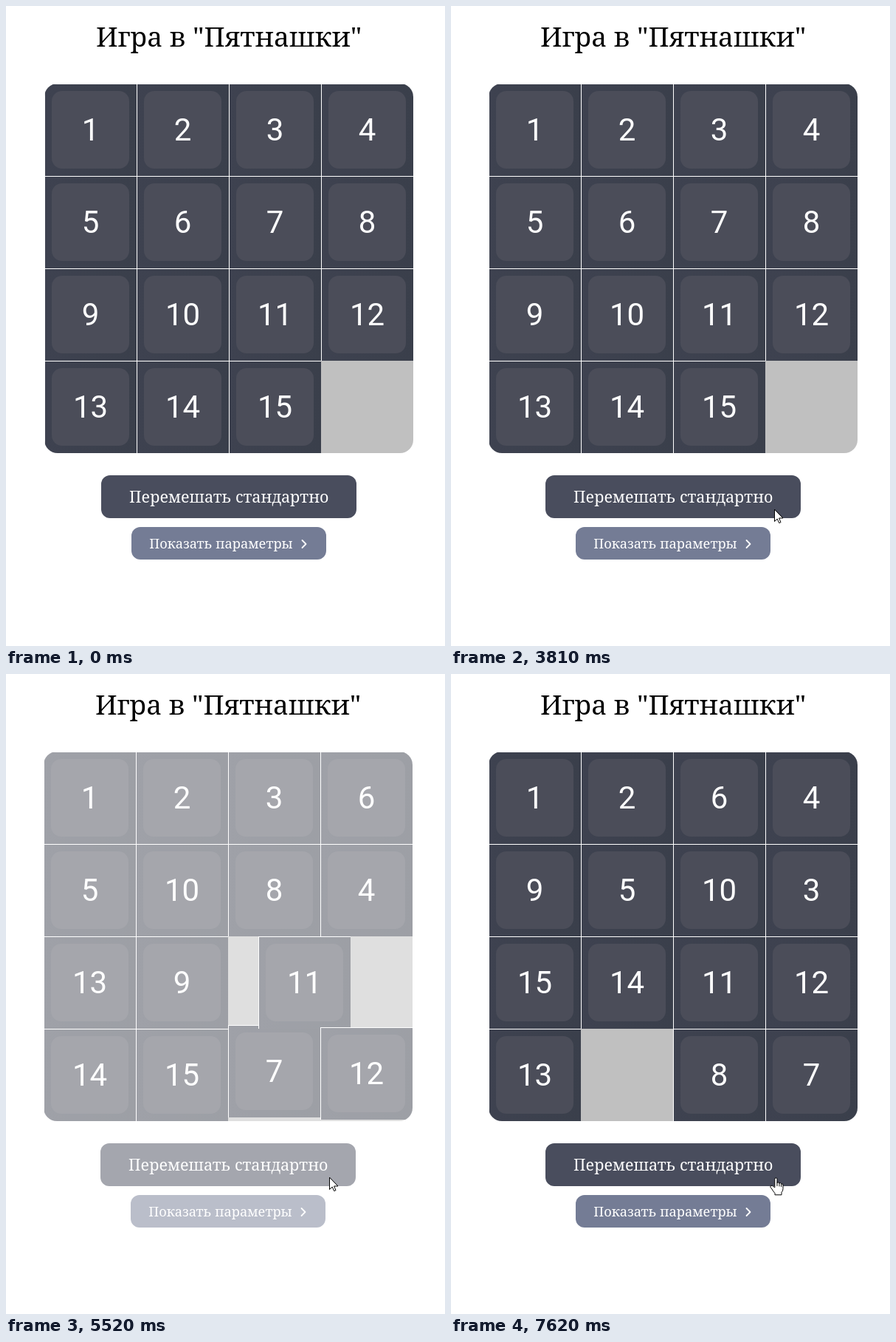
An HTML page with a canvas for the animation above (8000 ms loop, 595 by 866 pixels).

```html
<!DOCTYPE html>
<html lang="ru">
<head>
<meta charset="utf-8">
<title>Игра в "Пятнашки"</title>
<style>
  html, body { margin: 0; width: 100%; height: 100%; overflow: hidden; background: #fff; }
  canvas { display: block; }
</style>
</head>
<body>
<canvas id="stage" width="595" height="866"></canvas>
<script>
const ctx = document.getElementById('stage').getContext('2d');
const LOOP = 8000, CELL = 125, TOP = 105, SIZE = 500;

// Tiles in the order they slide into the gap
const MOVES = [
  12, 11, 7, 6, 5, 1, 2, 3, 6, 8, 4, 6, 3, 2, 1, 5, 10,
  9, 13, 14, 15, 7, 11, 12, 7, 15, 14, 13, 9, 11, 8, 10, 5,
  9, 13, 14, 15, 8, 10, 3, 6, 4, 3, 10, 11, 15, 14, 13, 15, 14
];
const FIRST_MOVE = 3862, MOVE_GAP = 71.4, SLIDE = 200;
const RUN_START = 3810, RUN_STEP = 68.04;
const UNLOCK = 7365;

const clamp = v => Math.min(1, Math.max(0, v));
const lerp = (a, b, p) => a + (b - a) * p;

function bezier(x1, y1, x2, y2) {
  const at = (a, b, s) => 3 * a * s * (1 - s) ** 2 + 3 * b * s * s * (1 - s) + s ** 3;
  return x => {
    if (x <= 0) return 0;
    if (x >= 1) return 1;
    let lo = 0, hi = 1;
    for (let i = 0; i < 20; i++) {
      const mid = (lo + hi) / 2;
      if (at(x1, x2, mid) < x) lo = mid; else hi = mid;
    }
    return at(y1, y2, lo);
  };
}
const ease = bezier(.25, .1, .25, 1);
const easeInOut = bezier(.42, 0, .58, 1);

// Progress from 0 to 1 in a number of hard steps
function stepped(t, from, to, steps) {
  const n = steps - 1;
  return clamp(Math.floor((t - from) / (to - from) * n + .1) / n);
}

function box(x, y, w, h, r, fill) {
  ctx.beginPath();
  ctx.roundRect(x, y, w, h, r);
  ctx.fillStyle = fill;
  ctx.fill();
}

function label(text, x, y, font, color) {
  ctx.font = font;
  ctx.fillStyle = color;
  ctx.textAlign = 'center';
  ctx.fillText(text, x, y);
}

const serif = px => px + 'px "Noto Serif", serif';

function tilePositions(t) {
  const cells = Array.from({ length: 16 }, (_, i) => ({ x: i % 4, y: Math.floor(i / 4) }));
  const tiles = cells.slice(0, 15).map(c => ({ ...c }));
  let gap = cells[15];
  MOVES.forEach((number, i) => {
    const start = FIRST_MOVE + i * MOVE_GAP;
    if (t <= start) return;
    const from = tiles[number - 1], p = ease((t - start) / SLIDE);
    tiles[number - 1] = {
      x: gap.x, y: gap.y,
      dx: lerp(from.x, gap.x, p), dy: lerp(from.y, gap.y, p)
    };
    gap = { x: from.x, y: from.y };
  });
  return tiles;
}

function drawTile(number, x, y) {
  ctx.fillStyle = '#fff';
  ctx.fillRect(x, y, CELL, CELL);
  const shade = ctx.createLinearGradient(x, y, x + CELL, y);
  shade.addColorStop(0, '#3e4250');
  shade.addColorStop(1, '#3a3f4b');
  ctx.fillStyle = shade;
  ctx.fillRect(x + 1, y + 1, CELL - 1, CELL - 1);
  box(x + 10, y + 10, 105, 105, 14, '#4b4d59');
  label(number, x + 62.5, y + 77, '42px Roboto, Arial, sans-serif', '#fff');
}

function drawBoard(t, left) {
  ctx.save();
  ctx.beginPath();
  ctx.roundRect(left, TOP, SIZE, SIZE, 18);
  ctx.clip();
  ctx.fillStyle = '#c0c0c0';
  ctx.fillRect(left, TOP, SIZE, SIZE);
  tilePositions(t).forEach((tile, i) => {
    const { x, y, dx = x, dy = y } = tile;
    drawTile(i + 1, left + Math.round(dx * CELL), TOP + Math.round(dy * CELL));
  });
  ctx.restore();
}

function drawButtons(left) {
  box(left + 77, 635, 346, 58, 12, '#494d5d');
  label('Перемешать стандартно', left + 250.3, 672, serif(21.6), '#fff');
  box(left + 118, 705, 264, 44, 12, '#747c95');
  label('Показать параметры', left + 239.5, 734, serif(18.3), '#fff');
  ctx.beginPath();
  ctx.moveTo(left + 349.5, 723);
  ctx.lineTo(left + 354.5, 728);
  ctx.lineTo(left + 349.5, 733);
  ctx.strokeStyle = '#fff';
  ctx.lineWidth = 1.8;
  ctx.lineCap = ctx.lineJoin = 'round';
  ctx.stroke();
}

const ARROW = 'M.5 .5V16.5L4.2 13L6.7 18.6L9 17.6L6.6 12H11.6Z';
const HAND = 'M.8 13.5V2.5Q.8 .9 2.4 .9T4 2.5V7.3Q5.6 6.2 7 8Q8.8 7 9.7 8.8'
  + 'Q12 8.3 12 10.8V15.5Q12 18.5 10 20.5V23.8H1V21.5Q-1.5 19-3 16'
  + 'L-5.2 13.2Q-5.4 10.8-3 11.2Z';
const KNUCKLES = 'M4 7V11.5M7 8V12M9.7 9V12.5';

function drawCursor(x, y, hand) {
  ctx.save();
  ctx.translate(x, y);
  ctx.lineWidth = 1;
  ctx.lineJoin = 'miter';
  ctx.fillStyle = '#fff';
  ctx.strokeStyle = '#000';
  const shape = new Path2D(hand ? HAND : ARROW);
  ctx.fill(shape);
  ctx.stroke(shape);
  if (hand) ctx.stroke(new Path2D(KNUCKLES));
  ctx.restore();
}

function cursorAt(t) {
  const glide = (x1, y1, x2, y2, p) => [Math.round(lerp(x1, x2, p)), Math.round(lerp(y1, y2, p))];
  if (t < 520) return null;
  if (t < 2270) {
    const p = stepped(t, 520, 1010, 8);
    return glide(533, 810, 360, 548, p * (2 - p));
  }
  if (t < 2810) {
    const p = stepped(t, 2270, 2540, 5);
    return glide(423, 626, 537, 780, p * (2 - p));
  }
  if (t < 3140) return [536, 780];
  return glide(498, 742, 438, 681, stepped(t, 3140, 3280, 3));
}

function overButton(x, y, left) {
  const inside = (bx, by, w, h) => x >= bx && x < bx + w && y >= by && y < by + h;
  return inside(left + 77, 635, 346, 58) || inside(left + 118, 705, 264, 44);
}

function draw(time) {
  const run = Math.floor((time - RUN_START + 8) / RUN_STEP);
  const t = run >= 0 ? RUN_START + run * RUN_STEP : time;
  const left = t < 2810 ? 52 : 51;

  ctx.fillStyle = '#fff';
  ctx.fillRect(0, 0, 595, 866);
  label('Игра в "Пятнашки"', left + 250, 55, serif(37), '#000');
  drawBoard(t, left);
  drawButtons(left);

  // A white veil over the board and buttons equals their half opacity
  const veil = .5 * (easeInOut((t - 3800) / 430) - ease((t - UNLOCK) / 250));
  if (veil > 0) {
    ctx.fillStyle = `rgba(255,255,255,${veil})`;
    ctx.fillRect(0, 100, 595, 660);
  }

  if (t >= 3610 && t < RUN_START) {
    ctx.beginPath();
    ctx.arc(438, 681, 15, 0, 2 * Math.PI);
    ctx.fillStyle = 'rgba(255,255,0,.47)';
    ctx.fill();
  }

  const spot = cursorAt(t);
  if (spot) {
    const locked = t >= RUN_START && t < UNLOCK;
    drawCursor(...spot, !locked && overButton(...spot, left));
  }
}

const began = performance.now();
function tick() {
  draw((performance.now() - began) % LOOP);
  requestAnimationFrame(tick);
}
tick();
</script>
</body>
</html>
```
